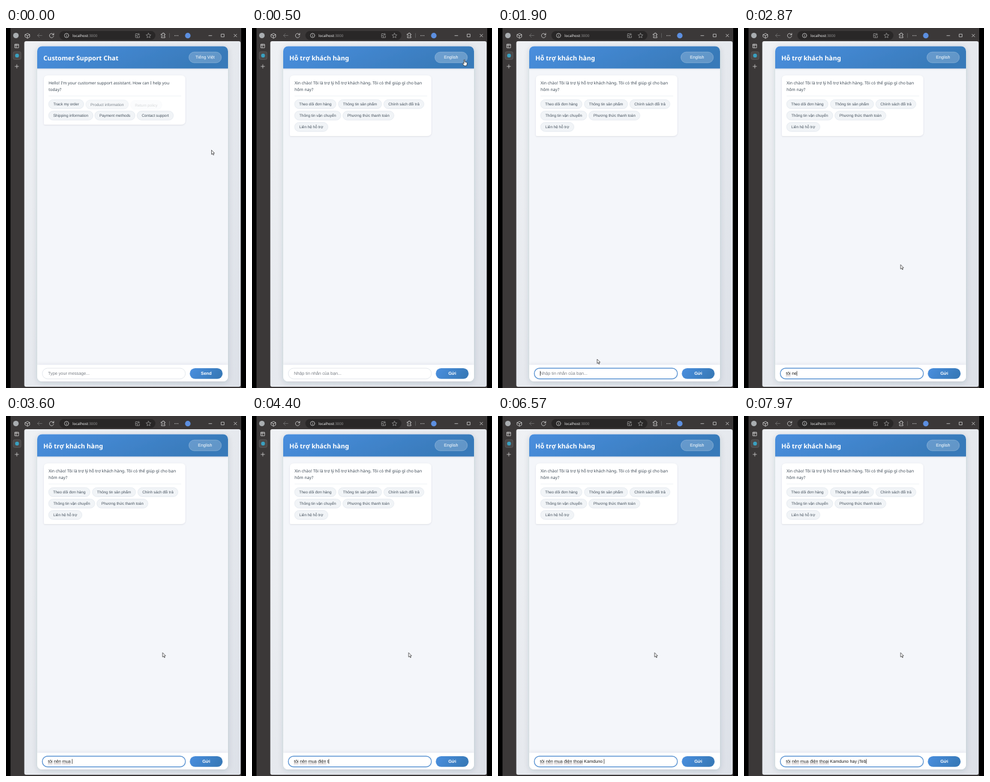
Animation of 400x600 px, one loop 8 s. Source, as an HTML page:

```html
<!DOCTYPE html>
<html lang="vi">
<head>
<meta charset="utf-8">
<title>Support chat</title>
<style>
html, body { margin: 0; width: 100%; height: 100%; overflow: hidden; background: #000; }
svg { display: block; width: 400px; height: 600px; }
text { white-space: pre; text-rendering: geometricPrecision; }
.ui { font-family: "Noto Sans", "Open Sans", sans-serif; }
.ar { font-family: "Liberation Sans", Arial, sans-serif; }
.mid { text-anchor: middle; }
.ico { fill: none; stroke: #d6d6d6; stroke-width: .8; stroke-linecap: round; stroke-linejoin: round; }
</style>
</head>
<body>
<svg viewBox="0 0 400 600" xmlns="http://www.w3.org/2000/svg">
  <defs>
    <linearGradient id="blue" x1="0" y1="0" x2="1" y2="0.25">
      <stop offset="0" stop-color="#4a8fdf"/><stop offset="1" stop-color="#387ab9"/>
    </linearGradient>
    <linearGradient id="page" x1="0" y1="0" x2="1" y2="1">
      <stop offset="0" stop-color="#eff1f4"/><stop offset="1" stop-color="#dde1e8"/>
    </linearGradient>
    <filter id="soft" x="-20%" y="-20%" width="140%" height="140%">
      <feDropShadow dx="0" dy="2" stdDeviation="4" flood-color="#23344a" flood-opacity=".17"/>
    </filter>
    <filter id="thin" x="-10%" y="-20%" width="120%" height="150%">
      <feDropShadow dx="0" dy=".8" stdDeviation="1" flood-color="#23344a" flood-opacity=".13"/>
    </filter>
    <clipPath id="card"><rect x="52" y="30.5" width="318" height="558.5" rx="8"/></clipPath>
  </defs>

  <!-- browser -->
  <rect width="400" height="600"/>
  <rect x="7.5" width="384.5" height="600" fill="#3b3838"/>
  <circle cx="16.5" cy="12.5" r="4.6" fill="#a9adb0"/>
  <g class="ico">
    <path d="M32 11l4-2 3.5 2v4l-3.5 2-4-2zM32 11l3.700 2 3.800-2M35.700 13v4"/>
    <path d="M60 12.500h-7.500m3-3-3 3 3 3" stroke="#777"/>
    <path d="M79.300 11.200a3.600 3.600 0 1 0 .2 2.400M79.700 8.800v2.600h-2.600"/>
  </g>
  <rect x="89" y="5" width="160" height="15" rx="7.500" fill="#292727"/>
  <g class="ico">
    <circle cx="101" cy="12.500" r="3.600"/><path d="M101 12.300v2M101 10.700v.1"/>
    <g stroke="#999">
      <path d="M219 9.500h-3v6.500h6.500v-3M216 12.700h3.300V16M221 8.800v3.400M219.300 10.500h3.400"/>
      <path d="M237.500 8.600l1.200 2.600 2.800.3-2.100 1.900.6 2.800-2.500-1.400-2.500 1.400.6-2.800-2.100-1.900 2.800-.3z"/>
    </g>
    <path d="M259 10h2a1.300 1.300 0 1 1 2.400 0h1.600v2a1.200 1.200 0 1 0 0 2.200v2h-6v-2a1.300 1.300 0 1 0 0-2.300z"/>
    <path d="M272.500 9v7" stroke="#666"/>
    <path d="M281.500 12.700h.1M284 12.700h.1M286.500 12.700h.1" stroke-width="1.200"/>
    <path d="M338 12.700h5M359 10.200h4.600v4.600H359zM380 10.300l4.500 4.500m0-4.500-4.500 4.500"/>
    <path d="M15 27h6v6h-6zM17 27v6M15 28.700h6"/>
    <path d="M18 61v6M15 64h6"/>
  </g>
  <circle cx="303" cy="12.700" r="4.600" fill="#5c8fe0"/>
  <rect x="12" y="39.500" width="13" height="13" rx="2.500" fill="#4b4848" stroke="#666363" stroke-width=".6"/>
  <circle cx="18.400" cy="46" r="3.200" fill="#3aa0c0"/>
  <text class="ui" x="111" y="14.900" font-size="6.100" fill="#f2f2f2">localhost<tspan fill="#929292">:3000</tspan></text>

  <!-- page -->
  <rect x="30.500" y="22" width="360.500" height="576" rx="3" fill="url(#page)"/>
  <rect x="52" y="30.500" width="318" height="558.500" rx="8" fill="#f4f6fa" filter="url(#soft)"/>
  <g clip-path="url(#card)">
    <rect x="52" y="30" width="318" height="37.500" fill="url(#blue)" filter="url(#thin)"/>
    <rect x="52" y="561.500" width="318" height="30" fill="#fff" filter="url(#soft)"/>
  </g>
  <text id="title" class="ui" x="62.300" y="53.500" font-size="10.700" font-weight="600" fill="#fff"></text>
  <rect id="langBox" x="304.800" y="40" width="54.200" height="18" rx="9" fill="#fff" stroke="#fff" stroke-opacity=".35" stroke-width=".7"/>
  <text id="lang" class="ar mid" x="331.800" y="51.400" font-size="7.200" fill="#fff"></text>

  <path id="bubble" fill="#fff" filter="url(#thin)"/>
  <path d="M71 113.300H292" stroke="#e9edf1" stroke-width=".7"/>
  <g class="ui" font-size="6.850" fill="#3c4854">
    <text id="line1" x="71" y="94.200"></text>
    <text id="line2" x="71" y="105.200"></text>
  </g>
  <g id="chips" class="ar mid" font-size="6.400" fill="#44505c"></g>

  <!-- composer -->
  <rect id="input" x="60.500" y="567" width="238.500" height="17.800" rx="8.900" fill="#fff"/>
  <text id="typed" class="ar" x="70" y="578.300" font-size="7.250"></text>
  <path id="marks" fill="none" stroke="#6b4a4e" stroke-width=".7" stroke-dasharray="1 .6"/>
  <path id="caret" stroke="#111" stroke-width=".7"/>
  <rect x="306.300" y="567" width="54.700" height="17.800" rx="8.900" fill="url(#blue)"/>
  <text id="send" class="ar mid" x="333.700" y="578.400" font-size="7.300" font-weight="700" fill="#fff"></text>

  <!-- pointers -->
  <path id="arrow" d="M0 0v7.200l1.700-1.500 1.200 2.600 1.100-.5-1.200-2.500 2.300-.1z" fill="#fff" stroke="#222" stroke-width=".7"/>
  <path id="hand" d="M-.8.6a.8.800 0 0 1 1.600 0v3l3 .7q1 .3.8 1.500l-.5 2.500-.6 1.700h-4l-2.600-3.600q0-1.200 1.300-.6l1 .8z" fill="#fff" stroke="#111" stroke-width=".7"/>
  <path id="beam" d="M-1.600-3.700q1.600 0 1.600.8q0-.8 1.600-.8M0-3v6M-1.600 3.700q1.600 0 1.600-.8q0 .8 1.600.8" fill="none" stroke="#222" stroke-width=".8"/>
</svg>
<script>
const LOOP = 8000, SWITCH = 430, FOCUS = 1620, TEXT_X = 70;
const el = id => document.getElementById(id);
const set = (node, attrs) => { for (const k in attrs) node.setAttribute(k, attrs[k]); };
const clamp = v => Math.max(0, Math.min(1, v));

// chip: label, left, right, row
const langs = {
  en: {
    title: "Customer Support Chat", lang: "Tiếng Việt", send: "Send", hint: "Type your message...",
    line1: "Hello! I'm your customer support assistant. How can I help you", line2: "today?", bottom: 161,
    chips: [["Track my order", 71, 129.5, 0], ["Product information", 133, 204, 0], ["Return policy", 207.5, 260, 0],
      ["Shipping information", 71, 145, 1], ["Payment methods", 148, 215, 1], ["Contact support", 218.5, 279, 1]]
  },
  vi: {
    title: "Hỗ trợ khách hàng", lang: "English", send: "Gửi", hint: "Nhập tin nhắn của bạn...",
    line1: "Xin chào! Tôi là trợ lý hỗ trợ khách hàng. Tôi có thể giúp gì cho bạn", line2: "hôm nay?", bottom: 180,
    chips: [["Theo dõi đơn hàng", 71, 140, 0], ["Thông tin sản phẩm", 144, 216, 0], ["Chính sách đổi trả", 219.700, 286.500, 0],
      ["Thông tin vận chuyển", 71, 148, 1], ["Phương thức thanh toán", 151.500, 236.500, 1], ["Liên hệ hỗ trợ", 71, 126.500, 2]]
  }
};

// "<" marks a key that changes the letter before it
const keys = "to<ôi ne<ên mua d<đie<ê<ện thoa<ại Kamduno hay jTeb".match(/<?./gu);
const drafts = [""];
for (const k of keys) {
  const last = drafts[drafts.length - 1];
  drafts.push(k[0] === "<" ? last.slice(0, -1) + k[1] : last + k);
}
const keyTimes = [[0, 0], [2030, 0], [2150, 1], [2870, 7], [4400, 23], [4570, 24], [5470, 31], [5600, 32],
  [7300, 42], [7700, 43], [7930, 44], [7970, 45]];
const path = [[0, 342.5, 203.5], [100, 342.5, 203.5], [400, 354, 53], [650, 354, 53], [1270, 142, 587],
  [1400, 142, 592], [1540, 150, 577], [1780, 150, 577], [2300, 261, 394.5]];

function track(points, t, ease) {
  let i = 0;
  while (i < points.length - 1 && t >= points[i + 1][0]) i++;
  const a = points[i], b = points[i + 1];
  if (!b) return a.slice(1);
  const u = ease((t - a[0]) / (b[0] - a[0]));
  return a.slice(1).map((v, j) => v + (b[j + 1] - v) * u);
}
const linear = u => u;
const smooth = u => u * u * (3 - 2 * u);

const pen = document.createElement("canvas").getContext("2d");
pen.font = '7.25px "Liberation Sans", Arial, sans-serif';
const width = s => pen.measureText(s).width;

let shown = "";
function showLang(name) {
  if (name === shown) return;
  shown = name;
  const L = langs[name];
  for (const id of ["title", "lang", "send", "line1", "line2"]) el(id).textContent = L[id];
  set(el("bubble"), { d: `M70 79H292q7 0 7 7V${L.bottom - 7}q0 7-7 7H65q-2 0-2-2V86q0-7 7-7z` });
  el("chips").innerHTML = L.chips.map(([label, x, right, row]) => {
    const y = 119.400 + row * 19;
    return `<g><rect x="${x}" y="${y}" width="${right - x}" height="15" rx="7.500" fill="#f1f4f7" stroke="#e0e6ec" stroke-width=".7"/>` +
      `<text x="${(x + right) / 2}" y="${y + 9.700}">${label}</text></g>`;
  }).join("");
}

function drawChips(t) {
  [...el("chips").children].forEach((chip, i) => {
    const k = i > 2 ? 1 : smooth(clamp((t + 260 - i * 90) / 270));
    set(chip, { opacity: k, transform: `translate(0 ${(1 - k) * 1.800})` });
  });
}

function drawInput(t) {
  const focus = t >= FOCUS;
  const draft = drafts[Math.floor(track(keyTimes, t, linear)[0] + 1e-6)];
  set(el("input"), { stroke: focus ? "#5d95d3" : "#dce1e8", "stroke-width": focus ? 1.4 : .8 });
  el("typed").textContent = draft || langs[shown].hint;
  set(el("typed"), { fill: draft ? "#1c1c1c" : "#7a7f86" });

  let d = "", pos = 0;
  draft.split(" ").slice(0, -1).slice(0, 5).forEach(word => {
    const x = TEXT_X + width(draft.slice(0, pos));
    d += `M${x} 579.700h${width(word)}`;
    pos += word.length + 1;
  });
  set(el("marks"), { d });
  const on = focus && (draft || (t - FOCUS) % 1000 < 500);
  set(el("caret"), { d: `M${TEXT_X + width(draft) + .4} 571.700v8`, opacity: on ? 1 : 0 });
}

function drawPointer(t) {
  const [x, y] = track(path, t, smooth);
  const onLang = x > 305 && x < 359 && y > 40 && y < 58;
  const onInput = x > 60 && x < 299 && y > 567 && y < 596;
  const kind = onLang ? "hand" : onInput ? "beam" : "arrow";
  for (const id of ["arrow", "hand", "beam"])
    set(el(id), { transform: `translate(${x} ${y})`, visibility: id === kind ? "visible" : "hidden" });
  set(el("langBox"), { "fill-opacity": onLang ? .25 : .21 });
}

function draw(t) {
  showLang(t < SWITCH ? "en" : "vi");
  drawChips(t);
  drawInput(t);
  drawPointer(t);
}

const start = performance.now();
function tick(now) {
  draw(Math.max(0, now - start) % LOOP);
  requestAnimationFrame(tick);
}
draw(0);
requestAnimationFrame(tick);
</script>
</body>
</html>
```
